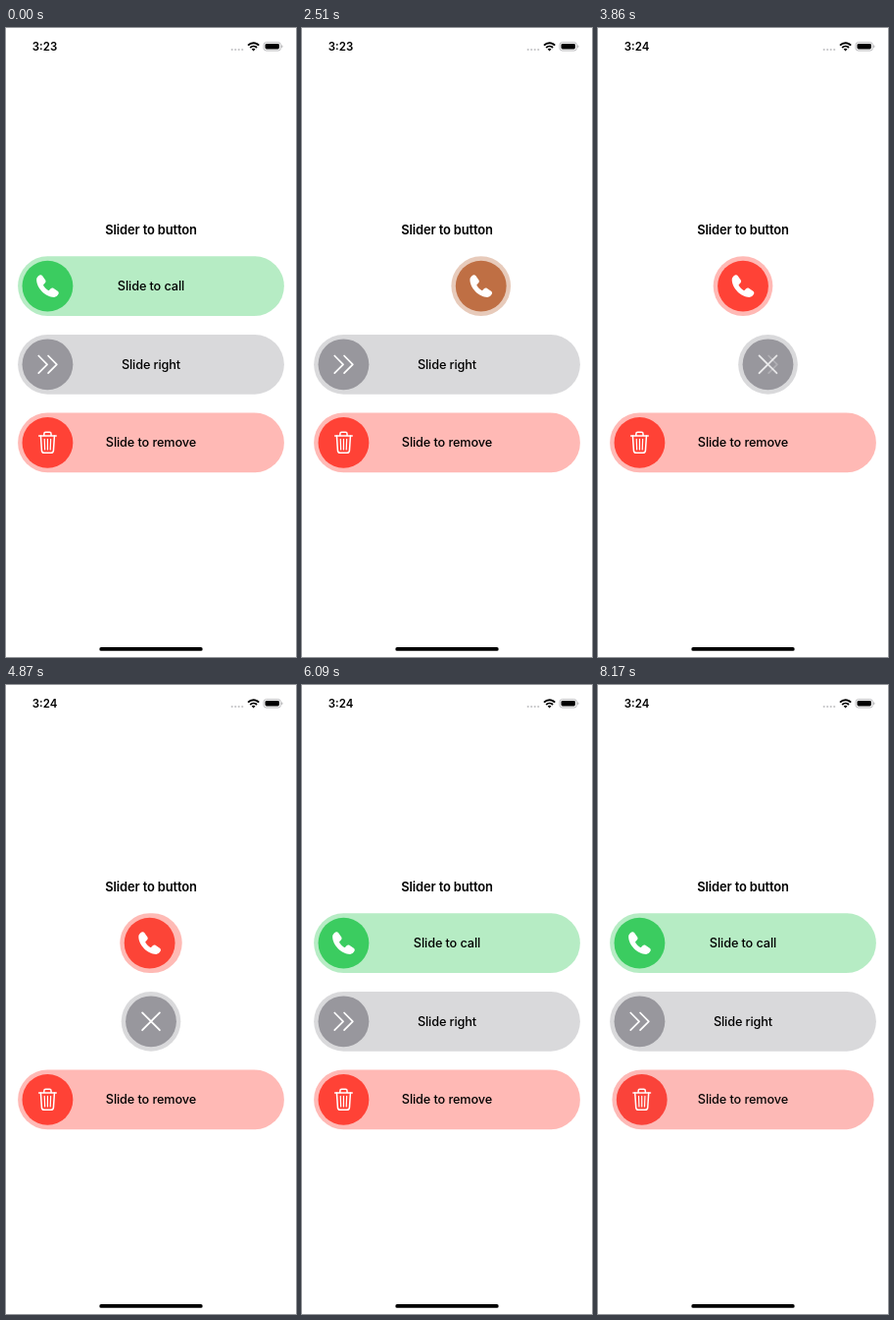
Write an HTML page that moves like this. It is 296 px wide and 640 px high and loops after 8220 ms.

```html
<!DOCTYPE html>
<html lang="en">
<head>
<meta charset="utf-8">
<title>Slider to button</title>
<style>
  html, body { margin: 0; width: 100%; height: 100%; overflow: hidden; background: #fff; }
  svg { display: block; width: 296px; height: 640px; }
  text { font-family: Inter, "Liberation Sans", sans-serif; text-anchor: middle; letter-spacing: -.1px; }
  .title { font-size: 12.9px; font-weight: 600; }
  .label { font-size: 12.7px; font-weight: 500; }
  .clock { font-size: 11.5px; font-weight: 600; letter-spacing: 0; }
  .line { fill: none; stroke: #fff; stroke-linecap: round; stroke-linejoin: round; }
</style>
</head>
<body>
<svg id="stage" viewBox="0 0 296 640">
  <text id="clock" class="clock" x="39.5" y="23">3:23</text>
  <g fill="#c4c4c6">
    <circle cx="230.7" cy="22" r="1.1"/><circle cx="234.2" cy="22" r="1.1"/>
    <circle cx="237.7" cy="22" r="1.1"/><circle cx="241.2" cy="22" r="1.1"/>
  </g>
  <g fill="none" stroke="#000" stroke-width="1.9">
    <path d="M247 17.6a8 8 0 0 1 11.2 0"/>
    <path d="M249.2 20a4.9 4.9 0 0 1 6.8 0"/>
  </g>
  <path d="M252.6 23.6l-1.9-2a2.7 2.7 0 0 1 3.8 0z"/>
  <rect x="263" y="14.6" width="17.4" height="8.4" rx="2.6" fill="none" stroke="#a9a9ab" stroke-width=".8"/>
  <rect x="264.5" y="16.1" width="14.4" height="5.4" rx="1.4"/>
  <path d="M281.4 17.3a1.6 1.6 0 0 1 0 3z" fill="#a9a9ab"/>
  <text class="title" x="148" y="210.4">Slider to button</text>
  <g id="rows"></g>
  <rect x="95.3" y="630" width="105.4" height="3.8" rx="1.9"/>
</svg>
<script>
const LOOP = 8220;
const LEFT = 12.1, RIGHT = 283.9, SIZE = 60.7, KNOB = 25.9;
const MID = 148 - SIZE / 2;
const GLOW = { starts: [420, 2850, 5280], speed: .525, width: 93 };
const CLOCK_TICK = 3000;

const GREEN = [59, 204, 96], GRAY = [152, 151, 157], RED = [255, 66, 54], BLUE = [10, 132, 255];

const line = (d, w) => `<path class="line" stroke-width="${w}" d="${d}"/>`;
const ICONS = {
  phone: `<path fill="#fff" d="M-11.3-6.6C-11.3-8.4-9.9-10-8.2-11C-7.2-11.6-6-11.4-5.2-10.3L-2.4-6.3
    C-1.6-5.1-1.8-4-2.7-3.1L-4.1-1.7C-4.5-1.2-4.4-.8-4.1-.3C-3 1.5-1.5 3 .3 4.1C.8 4.4 1.2 4.5 1.7 4.1
    L3.1 2.7C4 1.8 5.1 1.6 6.3 2.4L10.3 5.2C11.4 6 11.6 7.2 11 8.2C10 9.9 8.4 11.3 6.6 11.3
    C-2 11.3-11.3 2-11.3-6.6Z"/>`,
  chevrons: line('M-9.2-8.8L-.4 0L-9.2 8.8M.6-8.8L9.4 0L.6 8.8', 1.7),
  trash: line('M-8.8-7H8.8M-3.6-7V-9Q-3.6-10.6-2-10.6H2Q3.6-10.6 3.6-9V-7', 1.5) +
    line('M-7-7L-6 8Q-5.8 10.4-3.6 10.4H3.6Q5.8 10.4 6 8L7-7', 1.5) +
    line('M-3.2-3.6L-2.8 7M0-3.6V7M3.2-3.6L2.8 7', 1.2),
  cross: line('M-8.9-8.9L8.9 8.9M8.9-8.9L-8.9 8.9', 1.8),
  check: line('M-9 .8L-2.9 8.6L8.9-8.8', 1.8)
};

// drag: knob pulled right, back: button glides to the middle, open: slider returns
const rows = [
  { y: 262.6, label: 'Slide to call', from: GREEN, to: RED, icons: ['phone', 'phone'],
    drag: [2030, 2320], back: [2320, 2630], open: [4844, 5244] },
  { y: 342.3, label: 'Slide right', from: GRAY, to: GRAY, icons: ['chevrons', 'cross'],
    drag: [3465, 3640], back: [3640, 3965], open: [5690, 6090] },
  { y: 421.9, label: 'Slide to remove', from: RED, to: BLUE, icons: ['trash', 'check'],
    drag: [6420, 6690], back: [6690, 7010], open: [7806, 8206] }
];

const clamp = v => Math.min(1, Math.max(0, v));
const lerp = (a, b, p) => a + (b - a) * p;
const ease = p => p * p * (3 - 2 * p);
const phase = (t, [a, b]) => ease(clamp((t - a) / (b - a)));

function set(el, attrs) {
  for (const key in attrs) el.setAttribute(key, attrs[key]);
}

function build(row, i) {
  const g = document.createElementNS('http://www.w3.org/2000/svg', 'g');
  const top = row.y - SIZE / 2;
  const bar = name => `<rect data-id="${name}" y="${top}" height="${SIZE}" rx="${SIZE / 2}"/>`;
  g.innerHTML = `<clipPath id="clip${i}">${bar('clip')}</clipPath>${bar('track')}
    <g clip-path="url(#clip${i})">${bar('glow')}</g>
    <text data-id="text" class="label" x="148" y="${row.y + 4.5}">${row.label}</text>
    <g data-id="knob"><circle data-id="disc" r="${KNOB}"/>
      <g data-id="first">${ICONS[row.icons[0]]}</g>
      <g data-id="second">${ICONS[row.icons[1]]}</g></g>`;
  document.getElementById('rows').append(g);
  row.el = {};
  g.querySelectorAll('[data-id]').forEach(el => row.el[el.dataset.id] = el);
  set(row.el.glow, { width: GLOW.width, fill: '#fff', 'fill-opacity': .36 });
  set(row.el.track, { 'fill-opacity': .37 });
}

function pose(row, t) {
  if (t < row.open[0]) {
    const drag = phase(t, row.drag);
    const back = phase(t, row.back);
    const x = lerp(lerp(LEFT, RIGHT - SIZE, drag), MID, back);
    const end = lerp(RIGHT, MID + SIZE, back);
    return { x, width: end - x, mix: back, text: clamp(1 - 2 * drag) };
  }
  const open = phase(t, row.open);
  const x = lerp(MID, LEFT, open);
  return { x, width: 296 - 2 * x, mix: 1 - open, text: clamp(open * 1.6 - .6) };
}

function drawRow(row, t) {
  const { x, width, mix, text } = pose(row, t);
  const color = `rgb(${row.from.map((c, k) => Math.round(lerp(c, row.to[k], mix)))})`;
  const el = row.el;
  set(el.track, { x, width, fill: color });
  set(el.clip, { x, width });
  set(el.disc, { fill: color });
  set(el.text, { opacity: text });
  set(el.knob, { transform: `translate(${x + SIZE / 2} ${row.y})` });
  const same = row.icons[0] === row.icons[1];
  set(el.first, { opacity: same ? 1 : 1 - mix });
  set(el.second, { opacity: same ? 0 : mix });

  const start = GLOW.starts.filter(s => s <= t).pop();
  const lit = start !== undefined && t < row.drag[1];
  set(el.glow, { x: lit ? LEFT - GLOW.width + (t - start) * GLOW.speed : -200 });
}

const clock = document.getElementById('clock');

function draw(t) {
  clock.textContent = t < CLOCK_TICK ? '3:23' : '3:24';
  rows.forEach(row => drawRow(row, t));
}

rows.forEach(build);
const begin = performance.now();
function tick() {
  draw((performance.now() - begin) % LOOP);
  requestAnimationFrame(tick);
}
tick();
</script>
</body>
</html>
```
